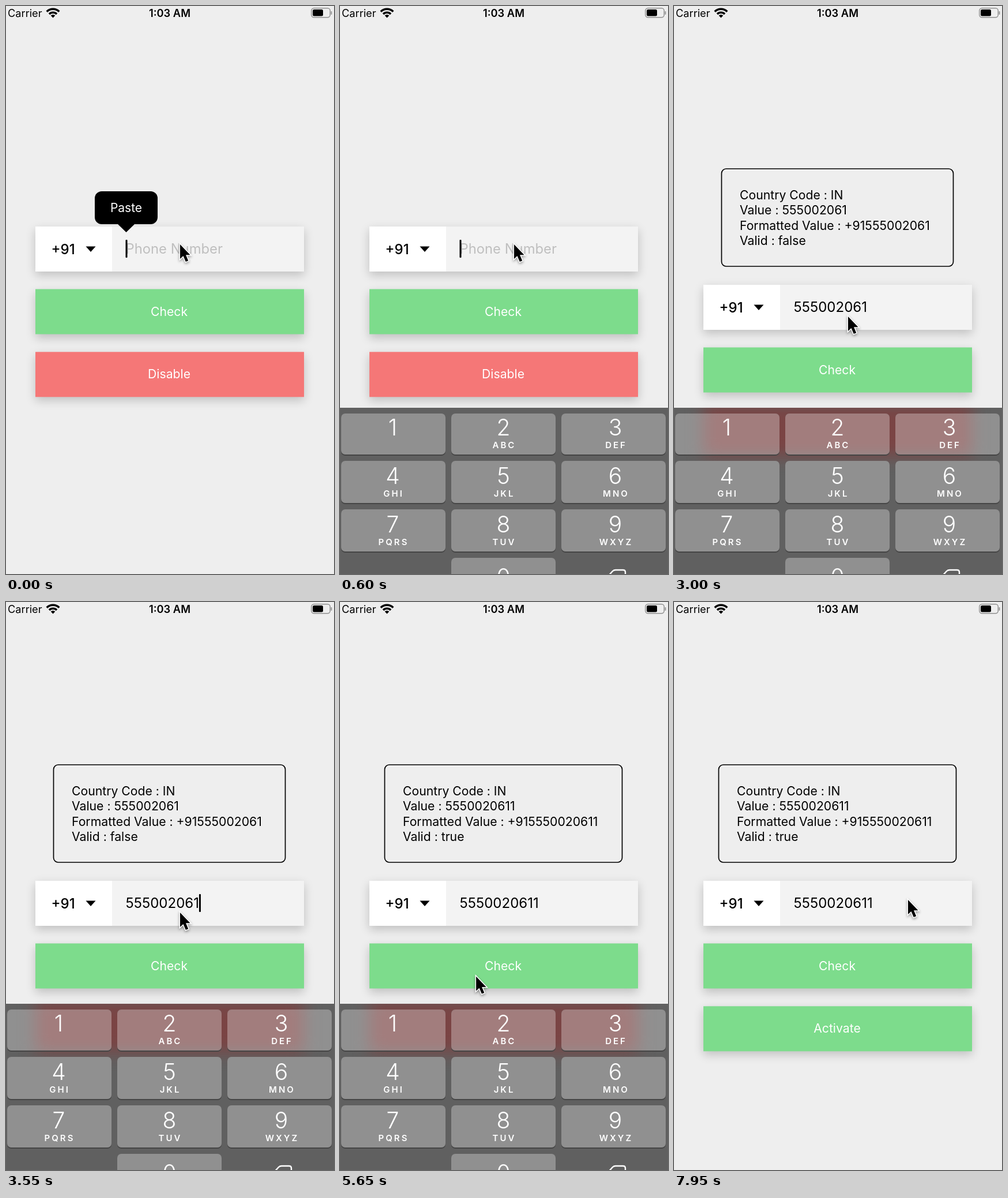
Animation of 569x984 px, one loop 8000 ms. Source, as an HTML page with a canvas:

```html
<!DOCTYPE html>
<html lang="en">
<head>
<meta charset="utf-8">
<title>Phone number form</title>
<style>
  html, body { margin: 0; height: 100%; overflow: hidden; background: #eee; }
  canvas { display: block; }
</style>
</head>
<body>
<canvas id="stage" width="569" height="984"></canvas>
<script>
const ctx = document.getElementById('stage').getContext('2d');
const LOOP = 8000;
const NUMBER = '5550020611';
const GREEN = '#7ddc8c', RED = '#f57777';

// Times in ms
const keyTimes = [850, 1015, 1180, 1345, 1510, 1675, 1840, 2005, 2250, 3800];
const firstCheck = 3000, secondCheck = 4900, disabledAt = 7000;
const pointerPath = [
  [0, 301, 412], [2500, 301, 412], [2900, 301, 537], [3950, 301, 537],
  [4450, 345, 632], [5100, 345, 632], [5700, 233, 648], [6450, 233, 648],
  [6850, 290, 735], [7300, 290, 735], [7750, 405, 515], [LOOP, 405, 515]
];

const progress = (t, from, to) => Math.min(1, Math.max(0, (t - from) / (to - from)));
const easeOut = p => 1 - (1 - p) ** 3;
const smooth = p => p * p * (3 - 2 * p);

function text(str, x, y, size, color = '#000', { weight = 400, align = 'left', spacing = 0 } = {}) {
  ctx.font = `${weight} ${size}px Inter, sans-serif`;
  ctx.letterSpacing = spacing + 'px';
  ctx.textAlign = align;
  ctx.fillStyle = color;
  ctx.fillText(str, x, y);
  const width = ctx.measureText(str).width;
  ctx.letterSpacing = '0px';
  return width;
}

function roundRect(x, y, w, h, r, fill, stroke, lineWidth) {
  ctx.beginPath();
  ctx.roundRect(x, y, w, h, r);
  if (fill) { ctx.fillStyle = fill; ctx.fill(); }
  if (stroke) { ctx.strokeStyle = stroke; ctx.lineWidth = lineWidth; ctx.stroke(); }
}

function polygon(points, fill) {
  ctx.beginPath();
  points.forEach(([x, y]) => ctx.lineTo(x, y));
  ctx.closePath();
  ctx.fillStyle = fill;
  ctx.fill();
}

function raisedBox(y, fill) {
  ctx.save();
  ctx.shadowColor = 'rgba(0,0,0,.2)';
  ctx.shadowBlur = 16;
  ctx.shadowOffsetY = 6;
  ctx.fillStyle = fill;
  ctx.fillRect(51, y, 466, 78);
  ctx.restore();
}

function button(label, y, fill) {
  raisedBox(y, fill);
  text(label, 283, y + 46, 21.2, '#fff', { align: 'center' });
}

function statusBar() {
  text('Carrier', 3, 19, 18.2);
  text('1:03 AM', 284, 19, 18.3, '#000', { weight: 600, align: 'center' });
  const bands = [[0, 5.5], [7.5, 11], [13.5, 17]];
  for (const [inner, outer] of bands) {
    ctx.beginPath();
    ctx.arc(81.5, 20.5, outer, -Math.PI * 0.75, -Math.PI * 0.25);
    ctx.arc(81.5, 20.5, inner, -Math.PI * 0.25, -Math.PI * 0.75, true);
    ctx.closePath();
    ctx.fillStyle = '#000';
    ctx.fill();
  }
  roundRect(529.8, 3.8, 32.5, 16, 4.5, null, '#8f8f8f', 1.5);
  roundRect(532, 6, 18, 11.5, 2.5, '#000');
  roundRect(563.6, 9, 1.8, 6, 1, '#8f8f8f');
}

function resultPanel(value, valid) {
  const x = value.length > 9 ? 77 : 82;
  roundRect(x + 0.5, 282, 567 - 2 * x - 1, 169, 8, null, '#000', 1.7);
  const lines = [
    'Country Code : IN', 'Value : ' + value,
    'Formatted Value : +91' + value, 'Valid : ' + valid
  ];
  lines.forEach((line, i) => text(line, x + 32, 335 + i * 26.4, 21.2));
}

function phoneField(y, value, caretOn) {
  raisedBox(y, '#f3f3f3');
  ctx.fillStyle = '#fff';
  ctx.fillRect(51, y, 133, 78);
  text('+91', 78.5, y + 48, 24, '#000', { weight: 500 });
  polygon([[138.5, y + 34.5], [155.5, y + 34.5], [147, y + 44]], '#000');
  const width = value ? text(value, 207.5, y + 47, 24) : 0;
  if (!value) text('Phone Number', 207.5, y + 47, 23.8, '#bfbfbf');
  if (caretOn) roundRect(207.5 + width, y + 23, 3, 31, 1, '#000');
}

function pasteBubble(alpha) {
  ctx.globalAlpha = alpha;
  roundRect(154, 321, 109, 57, 12, '#000');
  polygon([[193, 377], [224, 377], [208.5, 392]], '#000');
  text('Paste', 208.5, 357, 21, '#fff', { align: 'center' });
  ctx.globalAlpha = 1;
}

function keyboard(offset, redBehind) {
  ctx.save();
  ctx.beginPath();
  ctx.rect(0, 696 + offset, 569, 288);
  ctx.clip();
  ctx.fillStyle = '#606060';
  ctx.fillRect(0, 696, 569, 288);
  if (redBehind) {
    ctx.filter = 'blur(14px)';
    ctx.fillStyle = '#7a4444';
    ctx.fillRect(51, 690, 466, 90);
    ctx.filter = 'none';
  }
  ctx.translate(0, offset);

  const key = (x, y, h) => {
    roundRect(x, y + 2, 181, h, 7, '#454545');
    roundRect(x, y, 181, h, 7, '#606060');
    if (redBehind && y < 780) {
      ctx.save();
      ctx.clip();
      ctx.translate(0, -offset);
      ctx.filter = 'blur(14px)';
      ctx.fillStyle = '#7a4444';
      ctx.fillRect(51, 690, 466, 90);
      ctx.restore();
    }
    roundRect(x, y, 181, h, 7, 'rgba(255,255,255,.3)');
  };
  const letters = ['', 'ABC', 'DEF', 'GHI', 'JKL', 'MNO', 'PQRS', 'TUV', 'WXYZ'];
  const rows = [[706, 71, 744], [788, 73, 828], [872, 73, 912]];
  const centers = [91.5, 283.5, 477.5];
  letters.forEach((label, i) => {
    const col = i % 3, [y, h, baseline] = rows[Math.floor(i / 3)];
    key(2 + col * 191, y, h);
    text(i + 1, centers[col], baseline, 39, '#fff', { weight: 300, align: 'center' });
    text(label, centers[col] + 1.5, baseline + 22.3, 15, '#fff',
      { weight: 600, align: 'center', spacing: 3 });
  });
  key(193, 956, 73);
  text('0', 283.5, 1003, 39, '#fff', { weight: 300, align: 'center' });

  ctx.strokeStyle = '#fff';
  ctx.lineWidth = 2.4;
  ctx.lineJoin = 'round';
  ctx.stroke(new Path2D('M463 990 L473 979 Q475 977 478 977 H491 Q495 977 495 981 V999 Q495 1003 491 1003 H478 Q475 1003 473 1001 Z M480 985 L489 994 M489 985 L480 994'));
  ctx.restore();
}

function pointer(t) {
  const i = pointerPath.findIndex(([time]) => time > t);
  const [t0, x0, y0] = pointerPath[i - 1], [t1, x1, y1] = pointerPath[i];
  const p = smooth(progress(t, t0, t1));
  ctx.save();
  ctx.translate(x0 + (x1 - x0) * p + 1, y0 + (y1 - y0) * p + 1);
  const arrow = new Path2D('M0 0 V25 L5.5 20 L9.8 30 L14.2 28.2 L10 18.2 H17.5 Z');
  ctx.shadowColor = 'rgba(0,0,0,.4)';
  ctx.shadowBlur = 4;
  ctx.shadowOffsetY = 2;
  ctx.lineWidth = 3;
  ctx.lineJoin = 'miter';
  ctx.strokeStyle = '#fff';
  ctx.stroke(arrow);
  ctx.shadowColor = 'transparent';
  ctx.fillStyle = '#000';
  ctx.fill(arrow);
  ctx.restore();
}

function draw(t) {
  ctx.fillStyle = '#eee';
  ctx.fillRect(0, 0, 569, 984);
  statusBar();

  const typed = keyTimes.filter(k => k <= t);
  const value = NUMBER.slice(0, typed.length);
  const lastKey = typed.length ? typed[typed.length - 1] : 0;
  const caretOn = t < disabledAt && (t - lastKey) % 1000 < 700;
  const checked = t >= firstCheck;
  const shift = checked ? 101 : 0;
  const disabled = t >= disabledAt;

  if (checked) resultPanel(value, t >= secondCheck);
  phoneField(382 + shift, value, caretOn);
  button('Check', 490.5 + shift, GREEN);
  button(disabled ? 'Activate' : 'Disable', 599.3 + shift, disabled ? GREEN : RED);

  const bubble = 1 - progress(t, 30, 230);
  if (bubble > 0) pasteBubble(bubble);

  const shown = easeOut(progress(t, 30, 450)) - easeOut(progress(t, 5950, 6300));
  if (shown > 0) keyboard(288 * (1 - shown), checked);
  pointer(t);
}

const start = performance.now();
function frame() {
  draw((performance.now() - start) % LOOP);
  requestAnimationFrame(frame);
}
frame();
</script>
</body>
</html>
```
